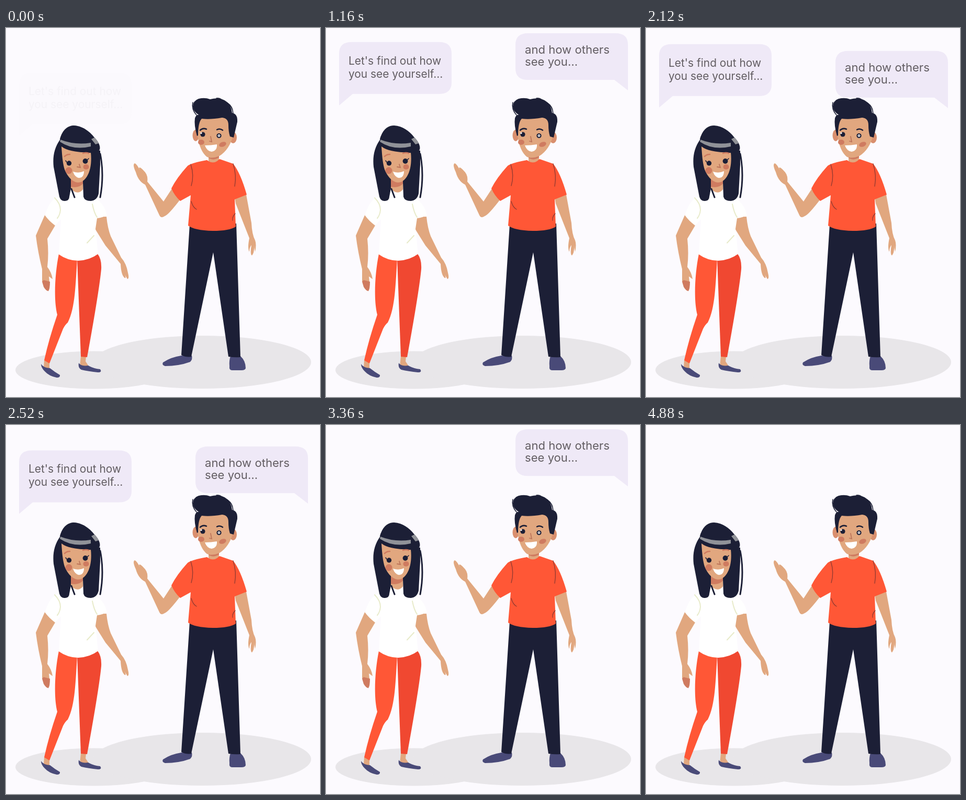
An HTML page for the animation above (4920 ms loop, 600 px wide and 704 px high).

```html
<!DOCTYPE html>
<html lang="en">
<head>
<meta charset="utf-8">
<title>Two people talking</title>
<style>
  html, body { margin: 0; width: 100%; height: 100%; overflow: hidden; background: #fcfafe; }
  svg { display: block; width: 100%; height: 100%; }
  text { font-family: Inter, "Open Sans", sans-serif; fill: #625d62; }
  .bubble { fill: #efe9f7; }
  .dark { fill: #1c1f36; }
  .skin { fill: #e1a77f; }
  .blush { fill: #cf7b60; }
  .red { fill: #ff5736; }
  .shoe { fill: #494a78; }
  .line { fill: none; stroke-linecap: round; }
</style>
</head>
<body>
<svg viewBox="0 0 600 704">
  <g fill="#e8e6e9">
    <ellipse cx="168" cy="652.5" rx="150" ry="36"/>
    <ellipse cx="375" cy="637.5" rx="208" ry="50.5"/>
  </g>

  <g id="left">
    <path class="bubble" d="M49 0H216Q240 0 240 22V77Q240 99 216 99H51L25 121V22Q25 0 49 0Z"/>
    <text font-size="20.9"><tspan x="43" y="43">Let's find out how</tspan><tspan x="43" y="68">you see yourself…</tspan></text>
  </g>
  <g id="right">
    <path class="bubble" d="M386 0H553Q577 0 577 22V109L551 89H386Q362 89 362 67V22Q362 0 386 0Z"/>
    <text font-size="22.1"><tspan x="380" y="39">and how others</tspan><tspan x="380" y="62">see you…</tspan></text>
  </g>

  <g id="woman">
    <path class="skin" d="M73 634L83 637V650L72 648ZM143 626L153 627 152 636 158 645 141 646Z"/>
    <path class="shoe" d="M67 641Q71 648 84 649Q94 657 103 662Q104 667 97 667Q82 664 74 655Q67 648 67 641ZM139 639Q143 646 157 644Q168 650 180 651Q184 657 176 657Q157 655 144 652Q137 648 139 639Z"/>
    <path class="red" d="M101 431C93 470 91 520 98 547Q82 593 73 634L83 640 109 574Q113 566 118 562C132 535 133 490 136 440Z"/>
    <path fill="#f04831" d="M136 440L175 431Q183 441 182 460Q178 502 155 628L143 627Z"/>
    <path class="skin" d="M75 355L57 396Q61 428 69 460L69 484H83L82 474 89 479Q87 466 79 456Q82 430 79 402L95 375ZM170 360H192Q194 381 200 397L220 438Q230 449 233 467Q236 478 232 479Q228 473 225 465Q231 478 227 477Q220 472 219 450L190 415 170 383Z"/>
    <path class="blush" d="M69 484L72 481 84 484Q84 498 81 502Q76 501 72 494Z"/>
    <path fill="#fff" d="M124 309L98 322Q87 328 81 340L74 357Q82 368 94 377L105 365 101 432Q118 444 138 444Q160 443 176 431L171 383 174 363Q184 362 193 357Q189 340 178 330L147 309Z"/>
    <path class="dark" d="M104 212C92 228 89 246 91 265L102 322Q105 331 113 330Q121 329 121 322L126 295H147L148 322Q150 330 162 330Q174 329 177 316L180 260V234Z"/>
    <path class="skin" d="M124 280H147V308Q137 320 124 307Z"/>
    <path class="blush" d="M124 289H147V297Q139 306 124 303Z"/>
    <path class="skin" d="M106 226Q121 238 162 237C164 255 162 275 152 287Q144 297 133 294Q120 289 112 270C108 257 107 241 106 226Z"/>
    <path class="dark" d="M103 212C108 193 119 186 130 186C149 187 163 201 169 209C177 217 181 226 179 232Q175 239 159 238Q126 237 104 222Z"/>
    <path fill="#909298" d="M104 213Q132 224 162 219L162 226Q128 234 103 217ZM163 212L169 209Q176 216 177 220L171 222Z"/>
    <path class="line" stroke="#1c1f36" stroke-width="3" d="M180 240Q188 280 180 323M125 307L131 323"/>
    <g class="blush">
      <circle cx="120" cy="272" r="6.5"/>
      <ellipse cx="153" cy="265" rx="5.5" ry="5"/>
    </g>
    <path class="line" stroke="#cf7b60" stroke-width="2.5" d="M112 245Q116 241 122 241M147 239Q153 237 158 239"/>
    <path class="line" stroke="#bd755b" stroke-width="1.8" d="M140 260L142 266 136 265"/>
    <g class="dark">
      <circle cx="120.5" cy="258" r="4.7"/>
      <circle cx="151.5" cy="254" r="4.9"/>
    </g>
    <path class="line" stroke="#1c1f36" stroke-width="1.5" d="M116 256L114 253M155 252L158 249"/>
    <path fill="#fff" d="M128 274Q139 278 149 273Q149 286 139 286Q131 284 128 274Z"/>
    <path class="line" stroke="#e8ebca" stroke-width="2" d="M93 324Q104 335 104 347Q103 357 98 363M165 336Q168 352 174 361M155 410L168 396"/>
  </g>

  <g id="man">
    <path class="shoe" d="M300 638Q315 628 335 625H355Q357 632 352 637Q330 645 304 645Q297 643 300 638ZM429 626H448Q458 635 458 649Q457 653 450 653H432Q426 653 427 645Q426 635 429 626Z"/>
    <path class="dark" d="M351 375L335 624Q345 629 354 627L396 428 425 627Q437 629 448 628L440 373Z"/>
    <path class="skin" d="M318 305L301 331 270 293Q272 280 263 272Q256 264 254 267L258 277Q252 261 246 258Q241 260 248 275Q253 293 266 299L293 357Q296 364 303 359Q310 357 333 327ZM437 324L459 318 469 372Q470 394 476 405Q479 413 476 427Q474 420 474 413Q475 429 470 434Q466 432 469 414Q465 419 465 427Q461 420 465 401L439 335Z"/>
    <path class="skin" d="M387 235H407V254Q396 261 387 254Z"/>
    <path class="blush" d="M387 243H407V247Q396 254 387 248Z"/>
    <path class="red" d="M384 252Q397 262 408 250L434 259Q448 276 460 318L437 327 439 379Q427 387 395 387Q360 386 348 377L353 319 333 330Q322 320 316 306Q326 286 347 263Q355 257 384 252Z"/>
    <path class="line" stroke="#8e3a32" stroke-width="1.3" d="M353 260Q360 282 354 301M434 259Q441 281 437 302M354 331Q357 342 364 346M438 354Q432 360 433 367"/>
    <g fill="#d98f6e">
      <ellipse cx="362.5" cy="205" rx="6" ry="11"/>
      <ellipse cx="434" cy="209" rx="7" ry="11"/>
    </g>
    <path class="skin" d="M366 170H434V205Q427 232 408 244Q394 250 384 246Q370 235 366 205Z"/>
    <path class="dark" d="M365 206Q359 185 361 172Q364 164 369 166Q358 160 357 150Q357 139 368 135Q380 132 390 136Q410 131 422 141Q430 146 432 162Q443 164 442 179L435 209 428 207Q425 198 425 185Q425 172 413 171Q390 175 374 173Q367 180 367 205Z"/>
    <path class="line" stroke="#1c1f36" stroke-width="1.6" d="M364 166Q354 155 357 142M402 134Q411 133 414 140M423 143Q433 149 434 163"/>
    <path class="line" stroke="#1c1f36" stroke-width="2.5" d="M371 195Q376 190 383 193M403 194Q409 191 414 195"/>
    <g class="blush">
      <ellipse cx="373" cy="218" rx="6" ry="5"/>
      <ellipse cx="414" cy="222" rx="7" ry="4.5" transform="rotate(-20 414 222)"/>
    </g>
    <path class="line" stroke="#bd755b" stroke-width="1.8" d="M391 207L393 217 389 216"/>
    <g class="dark">
      <circle cx="376" cy="203" r="4.6"/>
      <circle cx="407" cy="205.5" r="4.6"/>
    </g>
    <g fill="#fff">
      <circle cx="373" cy="200.5" r="1.6"/>
      <circle cx="407" cy="205.5" r="2.4"/>
      <path d="M380 224Q392 224 403 222Q404 234 393 236Q384 235 380 224Z"/>
    </g>
    <circle class="dark" cx="407" cy="205.5" r=".9"/>
  </g>
</svg>
<script>
  const LOOP = 4920, STEP = 40;
  const linear = p => p;
  const sine = p => (1 - Math.cos(Math.PI * p)) / 2;
  const clamp = v => Math.max(0, Math.min(1, v));

  // keys: [time in ms, value] pairs
  function track(keys, t, ease = linear) {
    let value = keys[0][1];
    for (let i = 1; i < keys.length; i++) {
      const [t0, v0] = keys[i - 1], [t1, v1] = keys[i];
      if (t >= t0) value = v0 + (v1 - v0) * ease(clamp((t - t0) / (t1 - t0)));
    }
    return value;
  }

  const bubbles = [
    { id: "left", ease: linear,
      y: [[0, 85], [680, 47], [1610, 8], [3345, 85]],
      alpha: [[-25, 0], [600, 1], [2660, 1], [3300, 0]] },
    { id: "right", ease: sine,
      y: [[960, 8], [2280, 45], [3420, 8], [4580, 45]],
      alpha: [[60, 0], [640, 1], [3650, 1], [4270, 0]] }
  ];

  function draw(now) {
    const t = Math.floor(now % LOOP / STEP) * STEP;
    for (const { id, ease, y, alpha } of bubbles) {
      const node = document.getElementById(id);
      node.setAttribute("transform", `translate(0 ${track(y, t, ease).toFixed(2)})`);
      node.setAttribute("opacity", track(alpha, t).toFixed(3));
    }
    requestAnimationFrame(() => draw(performance.now() - start));
  }
  const start = performance.now();
  draw(0);
</script>
</body>
</html>
```
